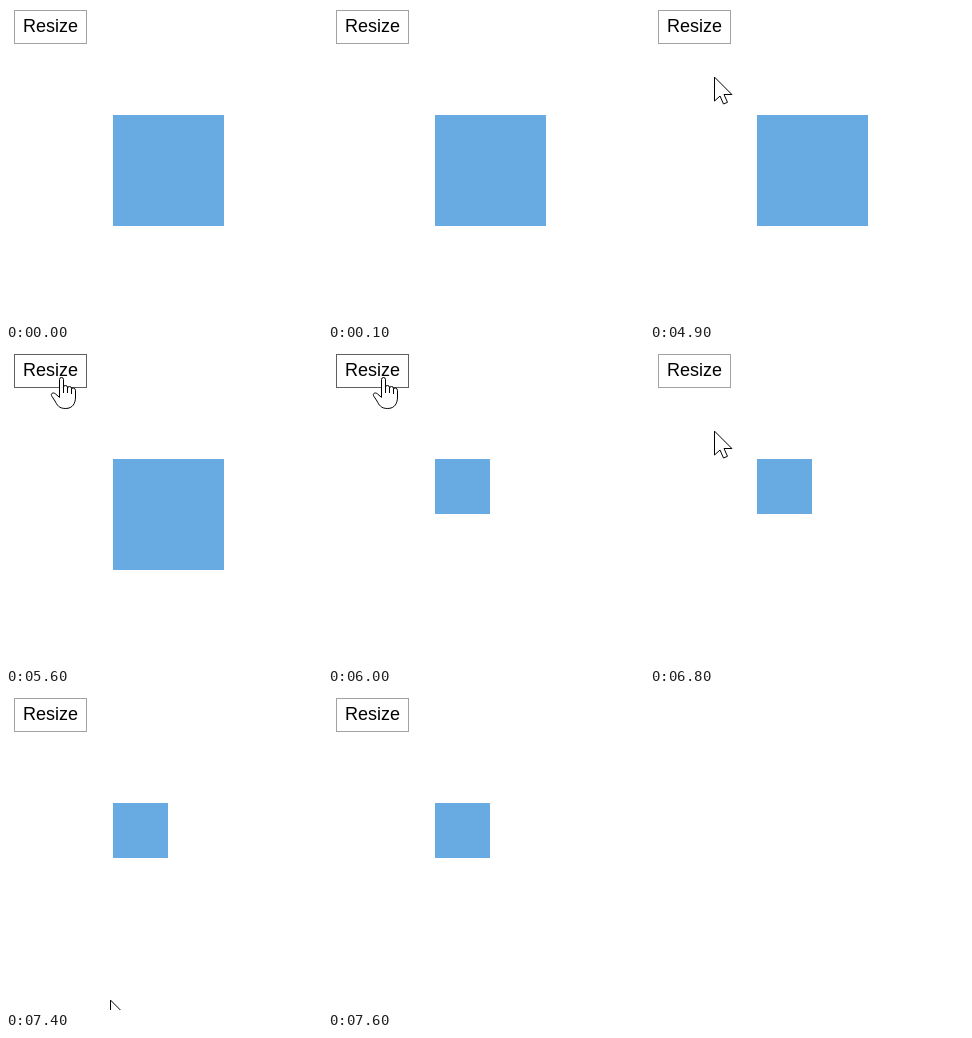
An HTML page that plays this animation: 316 px wide and 316 px high, repeating every 8400 ms.

```html
<!DOCTYPE html>
<html lang="en">
<head>
<meta charset="utf-8">
<title>Resize</title>
<style>
  html, body { margin: 0; height: 100%; overflow: hidden; background: #fff; }
  svg { display: block; width: 100vw; height: 100vh; }
  text { font: 18px "Liberation Sans", Arial, sans-serif; }
  #button { fill: #fff; }
  #pointer path { fill: #fff; stroke: #000; stroke-linejoin: round; stroke-linecap: round; }
</style>
</head>
<body>
<svg viewBox="0 0 316 316">
  <rect id="button" x="8.5" y="4.5" width="72" height="33"/>
  <text x="44.5" y="26" text-anchor="middle">Resize</text>
  <rect id="box" x="107" y="109" fill="#68aae2"/>
  <g id="pointer">
    <path id="arrow" d="M.5 .5V24L6 19L9.5 27L13.5 25.3L10 17.5H17.5Z"/>
    <path id="hand" d="M-1.5 20V2.5Q-1.5 .5 .5 .5T2.5 2.5V16V10Q2.5 8.5 4.5 8.5T6.5 10.5V16V11.5Q6.5 9.5 8.5 9.5T10.5 11.5V17V12.5Q10.5 10.5 12.5 11T14.5 13.5V20C14.5 26 12 31.5 4.5 31.5C-2 31.5 -4 28 -6 24L-9 19.5C-11 16.5 -8 15 -6 16.5Z"/>
  </g>
</svg>
<script>
const LOOP = 8400, SHOW = 4400, CLICK = 6000, HIDE = 7600;

// time, x, y of the pointer tip
const path = [
  [4400, 182, 174], [4600, 182, 174], [4900, 64, 71], [5000, 64, 71],
  [5300, 55, 27], [6700, 55, 27], [7100, 91, 241], [7600, 106, 318]
];

const el = id => document.getElementById(id);
const show = (id, on) => el(id).setAttribute("visibility", on ? "visible" : "hidden");

function tipAt(t) {
  const i = path.findIndex(p => p[0] > t);
  const [t0, x0, y0] = path[i - 1], [t1, x1, y1] = path[i];
  let u = (t - t0) / (t1 - t0);
  if (i === path.length - 1) u = 1 - (1 - u) ** 2;
  return [x0 + (x1 - x0) * u, y0 + (y1 - y0) * u].map(Math.round);
}

function draw(now) {
  const t = Math.floor(now % LOOP / 100) * 100;
  const visible = t >= SHOW && t < HIDE;
  let hover = false;
  if (visible) {
    const [x, y] = tipAt(t);
    hover = x >= 8 && x < 81 && y >= 4 && y < 38;
    el("pointer").setAttribute("transform", `translate(${x} ${y})`);
  }
  show("arrow", visible && !hover);
  show("hand", hover);
  el("button").setAttribute("stroke", hover ? "#606060" : "#a2a2a2");
  const size = t < CLICK ? 111 : 55;
  el("box").setAttribute("width", size);
  el("box").setAttribute("height", size);
}

const start = performance.now();
function tick() {
  draw(performance.now() - start);
  requestAnimationFrame(tick);
}
tick();
</script>
</body>
</html>
```
